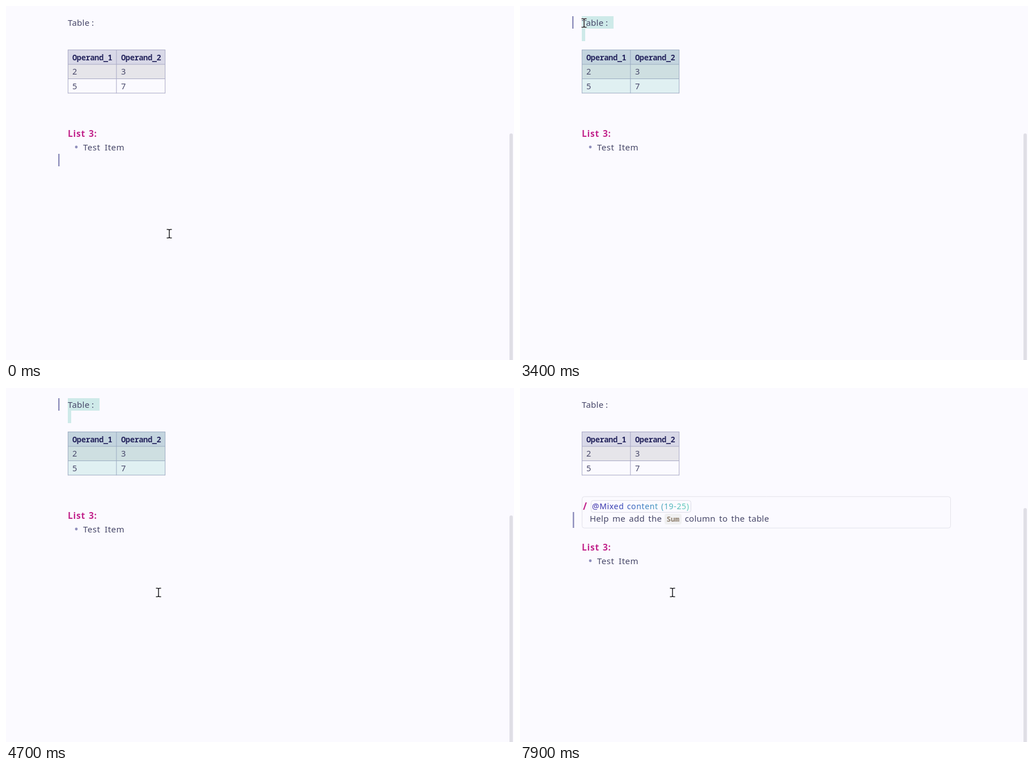
Animation of 896 by 625 pixels, one loop 8 s. Source, as an HTML page with a canvas:

```html
<!DOCTYPE html>
<html lang="en">
<head>
<meta charset="utf-8">
<title>Editing a table</title>
<style>
html, body { margin: 0; width: 100%; height: 100%; overflow: hidden; background: #fbfaff; }
canvas { display: block; }
</style>
</head>
<body>
<canvas id="stage" width="896" height="625"></canvas>
<script>
const ctx = document.getElementById('stage').getContext('2d');
const LOOP = 8000;
const SANS = '"Noto Sans", "Open Sans", sans-serif';
const MONO = '"Noto Sans Mono", "DejaVu Sans Mono", monospace';
const INK = '#474769', PINK = '#c2258c', BAR = '#9090bd', LINE = '#a9a9c5';
const BODY = { gap: .25, word: 2.2 };
const CODE = { weight: 600, family: MONO };

// Moments when the state of the page changes
const CLICK = 1350, SELECT = 2900, MENU = 3500, CLOSE = 4700, INSERT = 4900, BREAK = 5600;
const TYPE_START = 5650, TYPE_STEP = 27;
const PROMPT = 'Help me add the `Sum` column to the table';
const CODE_START = 16, CODE_END = 21;

const caretOn = [[200, 700], [CLICK, 1900], [2400, SELECT], [3700, 4350], [INSERT, 5450], [BREAK, 7200]];
const path = [
  [0, 288, 402], [100, 288, 402], [600, 125, 36], [900, 190, 88], [1300, 162, 179],
  [1650, 162, 179], [1850, 263, 246], [2100, 263, 246], [2650, 113, 30],
  [3600, 113, 30], [4200, 238, 309], [4450, 260, 370], [4600, 269, 361], [LOOP, 269, 361]
];

function text(str, x, y, size, color, o = {}) {
  ctx.font = `${o.weight || 400} ${size}px ${o.family || SANS}`;
  ctx.letterSpacing = (o.gap || 0) + 'px';
  ctx.wordSpacing = (o.word || 0) + 'px';
  ctx.fillStyle = color;
  ctx.fillText(str, x, y);
  return x + ctx.measureText(str).width;
}

function rect(x, y, w, h, color) {
  ctx.fillStyle = color;
  ctx.fillRect(x, y, w, h);
}

function round(x, y, w, h, r, fill, stroke) {
  ctx.beginPath();
  ctx.roundRect(x, y, w, h, r);
  if (fill) { ctx.fillStyle = fill; ctx.fill(); }
  if (stroke) { ctx.strokeStyle = stroke; ctx.lineWidth = 1; ctx.stroke(); }
}

function pointer(t) {
  const i = Math.max(1, path.findIndex(p => p[0] > t));
  const [t0, x0, y0] = path[i - 1], [t1, x1, y1] = path[i];
  const k = (t - t0) / (t1 - t0), e = k * k * (3 - 2 * k);
  return { x: x0 + (x1 - x0) * e, y: y0 + (y1 - y0) * e };
}

function drawPointer(p, arrow) {
  ctx.save();
  ctx.translate(Math.round(p.x), Math.round(p.y));
  if (arrow) {
    const shape = new Path2D('M0 0V15.5L3.6 12.2L6 17.5L8.4 16.4L6 11.3H10.8Z');
    ctx.fillStyle = '#fff';
    ctx.fill(shape);
    ctx.strokeStyle = '#55555f';
    ctx.lineWidth = 1.1;
    ctx.stroke(shape);
  } else {
    const beam = new Path2D('M-4.5 -7.5H-2Q0 -7.5 0 -6Q0 -7.5 2 -7.5H4.5M0 -6V6M-4.5 7.5H-2Q0 7.5 0 6Q0 7.5 2 7.5H4.5');
    ctx.strokeStyle = '#fff';
    ctx.lineWidth = 2.8;
    ctx.stroke(beam);
    ctx.strokeStyle = '#1c1c22';
    ctx.lineWidth = 1.5;
    ctx.stroke(beam);
  }
  ctx.restore();
}

function drawTable(selected) {
  rect(109, 78, 172, 25, '#d8d8e7');
  rect(109, 103, 172, 25, '#e6e5ea');
  ctx.strokeStyle = LINE;
  ctx.lineWidth = 1;
  ctx.beginPath();
  for (const y of [77.5, 103, 128.5, 153.8]) { ctx.moveTo(109, y); ctx.lineTo(281, y); }
  for (const x of [109.4, 194.8, 280.7]) { ctx.moveTo(x, 77); ctx.lineTo(x, 154.2); }
  ctx.stroke();
  if (selected) rect(109, 77, 172, 77, 'rgba(91,190,175,.17)');
  [['Operand_1', '2', '5'], ['Operand_2', '3', '7']].forEach((col, c) => col.forEach((cell, r) => {
    const x = 117 + c * 86, y = 95.5 + r * 25.5;
    if (r) text(cell, x, y, 14.5, INK);
    else text(cell, x, y, 13.7, '#26265e', { weight: 700, family: MONO, gap: -.4 });
  }));
}

function drawPage(t, selected) {
  if (selected) {
    rect(109, 18, 56, 22, 'rgba(91,190,175,.28)');
    rect(109, 40, 6, 22, 'rgba(91,190,175,.28)');
  }
  text('Table', 109, 35, 15, INK, BODY);
  text(':', 151, 35, 15, INK);
  drawTable(selected);
  const shift = t < INSERT ? 0 : t < BREAK ? 33 : 56;
  text('List 3:', 109, 231 + shift, 15.5, PINK, { weight: 700, gap: .8, word: 1 });
  ctx.fillStyle = BAR;
  ctx.beginPath();
  ctx.arc(124, 249 + shift, 2.4, 0, 7);
  ctx.fill();
  text('Test Item', 136, 254.5 + shift, 15, INK, { gap: .55, word: 3 });
  const top = t < INSERT ? 225 : t < BREAK ? 217 : 212;
  round(888, top, 6, 640 - top, 3, '#e0dfe6');
}

function drawPrompt(t) {
  round(109.5, 191.8, 650, t < BREAK ? 32.4 : 55.4, 4, null, '#e3e2ea');
  text('/', 111, 214.5, 17, PINK, { weight: 600 });
  round(125.5, 198.5, 176, 21, 4, null, '#dddde7');
  const fade = ctx.createLinearGradient(127, 0, 299, 0);
  fade.addColorStop(0, '#3a2ba6');
  fade.addColorStop(.3, '#3747b8');
  fade.addColorStop(.55, '#3d83c2');
  fade.addColorStop(.85, '#55bdba');
  fade.addColorStop(1, '#62cfb9');
  text('@Mixed content (19-25)', 127, 214, 14, fade, { gap: .65, word: 1 });
  if (t < BREAK) return 309;

  const n = Math.max(0, Math.min(PROMPT.length, Math.floor((t - TYPE_START) / TYPE_STEP)));
  let x = text(PROMPT.slice(0, Math.min(n, CODE_START)), 123, 236, 15, INK, BODY);
  if (n > CODE_START && n < CODE_END) {
    x = text(PROMPT.slice(CODE_START, n), 254, 236, 12.5, '#8f806f', CODE);
  } else if (n >= CODE_END) {
    round(255, 222, 30, 19, 4, '#f0f0f1');
    text('Sum', 258.5, 236, 12.5, '#8f806f', CODE);
    x = text(PROMPT.slice(CODE_END, n), 286.5, 236, 15, INK, BODY);
  }
  return x;
}

// Icons sit on a 24 unit grid
const icons = {
  link: 'M10 13a5 5 0 0 0 7.5.5l3-3a5 5 0 0 0-7-7L11.8 5M14 11a5 5 0 0 0-7.5-.5l-3 3a5 5 0 0 0 7 7l1.7-1.7',
  out: 'M15 3h6v6M10 14L21 3M18 13v6a2 2 0 0 1-2 2H5a2 2 0 0 1-2-2V8a2 2 0 0 1 2-2h6',
  brush: 'M14 10L19 3Q22 1 22 5L15 11M10 7L18 15L13 18L7 12ZM10 8Q7 13 2 13L11 22Q15 20 17 15M5 16L8 14',
  para: 'M13 4v16M17 4v16M19 4H9.5a4.5 4.5 0 0 0 0 9H13',
  insert: 'M2 6h12M2 12h10M2 18h12M15 12h7M18 8l4 4l-4 4',
  branch: 'M5 3v12M5 15a3 3 0 1 0 .1 0M18 3a3 3 0 1 0 .1 0M18 9Q18 15 8 18M19 15v6M16 18h6',
  cut: 'M6 3a3 3 0 1 0 .1 0M6 15a3 3 0 1 0 .1 0M20 4L8 16M15 15l5 5M8 8l4 4',
  copy: 'M10 8h10a2 2 0 0 1 2 2v10a2 2 0 0 1-2 2H10a2 2 0 0 1-2-2V10a2 2 0 0 1 2-2zM4 16a2 2 0 0 1-2-2V4a2 2 0 0 1 2-2h10a2 2 0 0 1 2 2',
  clip: 'M9 2h6v4H9zM15 4h3a2 2 0 0 1 2 2v14a2 2 0 0 1-2 2H6a2 2 0 0 1-2-2V6a2 2 0 0 1 2-2h3',
  search: 'M11 3a8 8 0 1 0 .1 0M21 21l-4.3-4.3',
  chat: 'M5 3h14a2 2 0 0 1 2 2v11a2 2 0 0 1-2 2h-4l-3 3l-3-3H5a2 2 0 0 1-2-2V5a2 2 0 0 1 2-2M8 12q4 4 8 0M9 8v.5M15 8v.5'
};
icons.check = icons.clip + 'M9 14l2 2l4-4';
icons.plain = icons.clip + 'M9 12v-1h6v1M12 11v6M11 17h2';

const groups = [
  [45, ['link', 'Add link'], ['out', 'Add external link']],
  [103, ['brush', 'Format', true], ['para', 'Paragraph', true], ['insert', 'Insert', true],
    ['branch', 'Extract current selection...']],
  [205, ['cut', 'Cut'], ['copy', 'Copy'], ['check', 'Paste'], ['plain', 'Paste as plain text'], ['box', 'Select all']],
  [330, ['search', 'Search for “Table: | Operand_1 | Op...”']],
  [365, ['chat', 'Steward: Add to the inline conversation'], ['chat', 'Steward: Add to the chat']]
];
const labelGap = { chat: .03, search: -.25 };
const rows = groups.flatMap(([y, ...items], g) =>
  items.map(([icon, label, sub], i) => ({ icon, label, sub, y: y + i * 22.4, off: g === 0 })));

function drawIcon(name, y, color) {
  ctx.save();
  ctx.translate(124, y - 7);
  ctx.scale(14 / 24, 14 / 24);
  ctx.strokeStyle = color;
  ctx.lineWidth = 2;
  ctx.lineCap = ctx.lineJoin = 'round';
  if (name === 'box') {
    ctx.lineCap = 'butt';
    ctx.setLineDash([2.5, 2.5]);
    ctx.strokeRect(2, 2, 20, 20);
  } else ctx.stroke(new Path2D(icons[name]));
  ctx.restore();
}

function drawMenu(p) {
  ctx.save();
  ctx.shadowColor = 'rgba(40,40,80,.1)';
  ctx.shadowBlur = 26;
  ctx.shadowOffsetY = 10;
  round(114, 31, 283, 371, 6, '#eeeef4');
  ctx.restore();
  round(113.5, 30.5, 283, 371, 6, '#eeeef4', '#cfcfd9');
  for (const [y] of groups.slice(1)) rect(117, y - 18.5, 277, 2, '#d6d6e0');
  const hover = rows.filter(r => !r.off && r.y - 11 <= p.y).pop();
  if (hover) round(117, hover.y - 11, 277, 22, 4, '#dcdce2');
  for (const r of rows) {
    const color = r.off ? '#a09fc0' : '#3b3a68';
    drawIcon(r.icon, r.y, color);
    text(r.label, 146, r.y + 4.5, 13, color, { gap: labelGap[r.icon] ?? .18 });
    if (r.sub) {
      ctx.strokeStyle = color;
      ctx.lineWidth = 1.4;
      ctx.stroke(new Path2D(`M377 ${r.y - 4.5}l4.5 4.5l-4.5 4.5`));
    }
  }
}

function draw(t) {
  const selected = t >= SELECT && t < INSERT;
  const menu = t >= MENU && t < CLOSE;
  const p = pointer(t);
  rect(0, 0, 896, 625, '#fbfaff');
  drawPage(t, selected);

  let caretX = 109, top = 261, h = 22;
  if (t >= BREAK) { top = 219; h = 28; }
  else if (t >= INSERT) { top = 197; h = 32; }
  else if (t >= SELECT) top = 18;
  else if (t >= CLICK) top = 169;
  if (t >= INSERT) caretX = drawPrompt(t);
  rect(t < INSERT ? 92 : 93, top, 2.5, h, BAR);
  if (caretOn.some(([a, b]) => t >= a && t < b)) {
    rect(Math.floor(caretX), top + (t >= INSERT ? 2 : 1), 1, 20, '#5a5a80');
  }
  if (menu) drawMenu(p);
  drawPointer(p, menu);
}

const start = performance.now();
function tick(now) {
  draw(Math.max(0, now - start) % LOOP);
  requestAnimationFrame(tick);
}
requestAnimationFrame(tick);
</script>
</body>
</html>
```
